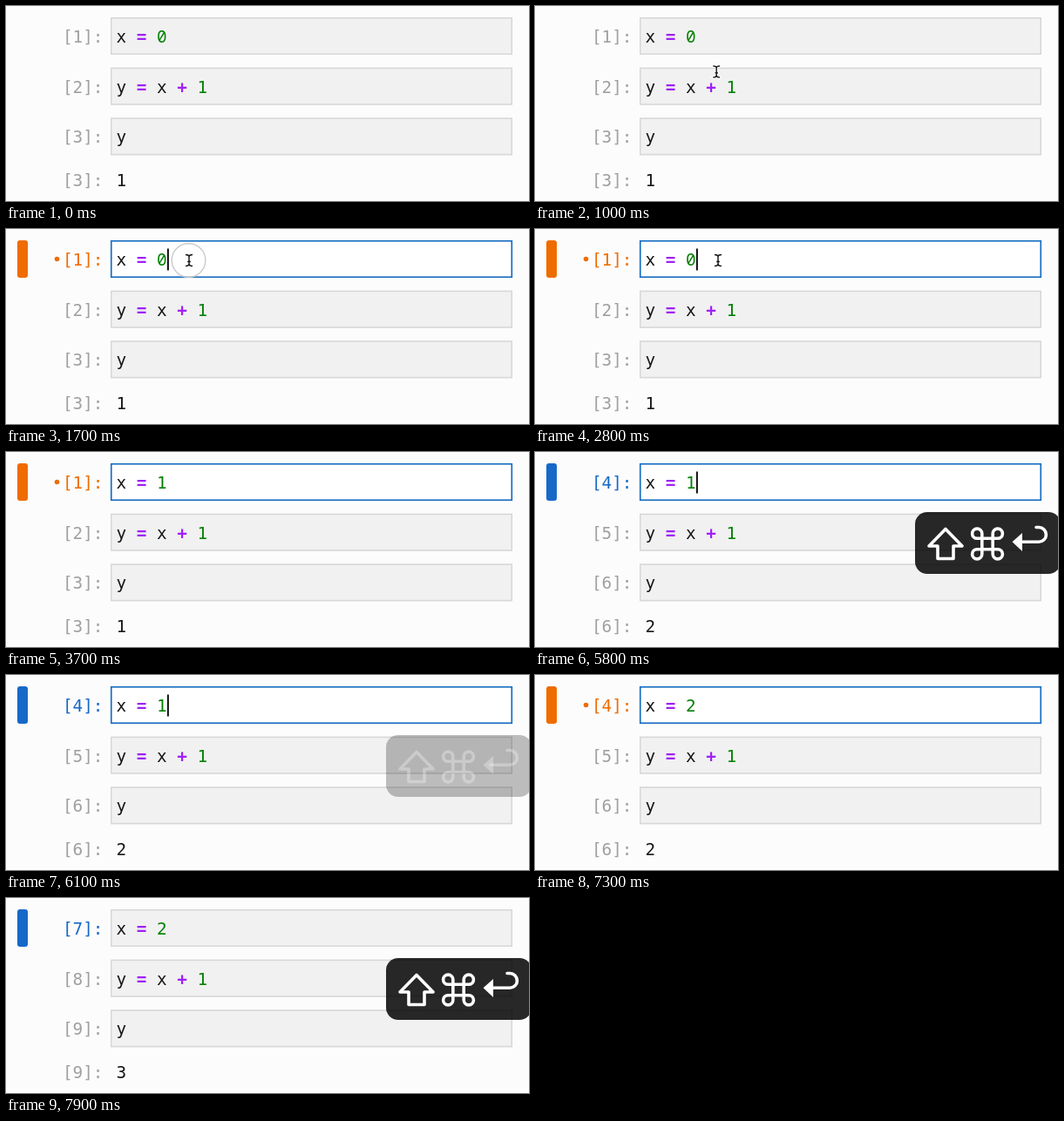
Write an HTML page with a canvas that moves like this. It is 600 px wide and 224 px high and loops after 8 s.

```html
<!DOCTYPE html>
<html lang="en">
<head>
<meta charset="utf-8">
<title>Notebook cells</title>
<style>
  html, body { margin: 0; width: 100%; height: 100%; overflow: hidden; background: #fcfcfc; }
  canvas { display: block; width: 600px; height: 224px; }
</style>
</head>
<body>
<canvas id="stage"></canvas>
<script>
const LOOP = 8000, W = 600, H = 224;
const SIZE = 19.3, ADV = SIZE * 0.602, CODE_X = 126.5, LABEL_X = 65;
const MONO = '"DejaVu Sans Mono", monospace';
const SLASHED = '"Noto Sans Mono", "DejaVu Sans Mono", monospace';
const INK = '#161616', GREEN = '#008000', PURPLE = '#a020f5';
const GREY = '#a0a0a0', BLUE = '#1769c8', ORANGE = '#ef6c00';

const canvas = document.getElementById('stage');
const dpr = window.devicePixelRatio || 1;
canvas.width = W * dpr;
canvas.height = H * dpr;
const ctx = canvas.getContext('2d');

const clamp = v => Math.max(0, Math.min(1, v));
const mix = (a, b, p) => a + (b - a) * p;
const ease = p => p * p * (3 - 2 * p);
const within = (t, a, b) => t >= a && t < b;
const rowY = i => 13 + i * 57.7;

function text(str, x, y, color, weight = 'normal', family = MONO) {
  ctx.font = `${weight} ${SIZE}px ${family}`;
  ctx.fillStyle = color;
  ctx.fillText(str, x, y);
}

function code(tokens, y) {
  tokens.forEach((tok, i) => {
    const x = CODE_X + i * 2 * ADV;
    if (/[=+]/.test(tok)) text(tok, x, y, PURPLE, 'bold');
    else if (/\d/.test(tok)) text(tok, x, y, GREEN, 'normal', tok === '0' ? SLASHED : MONO);
    else text(tok, x, y, INK);
  });
}

function roundRect(x, y, w, h, r) {
  ctx.beginPath();
  ctx.roundRect(x, y, w, h, r);
  ctx.fill();
}

function cell(i, editing) {
  const y = rowY(i);
  ctx.fillStyle = editing ? '#fff' : '#f1f1f1';
  ctx.strokeStyle = editing ? '#1b6fc2' : '#d7d7d7';
  ctx.lineWidth = editing ? 1.7 : 1.5;
  ctx.fillRect(120, y, 461, 43);
  ctx.strokeRect(120.75, y + 0.75, 459.5, 41.5);
}

function stateAt(t) {
  const run = t >= 7800 ? 2 : t >= 4100 ? 1 : 0;
  const deleting = within(t, 3000, 3200) || within(t, 6600, 6700);
  return {
    run,
    value: deleting ? '' : t >= 6700 ? '2' : t >= 3200 ? '1' : '0',
    editing: within(t, 1700, 4100) || within(t, 5800, 7800),
    dirty: within(t, 1700, 4100) || within(t, 6600, 7800),
    selected: t >= 1700,
    caret: within(t, 1700, 2300) || within(t, 2800, 3700) ||
           within(t, 5800, 6400) || within(t, 6600, 7200),
    keys: within(t, 4000, 6200) ? clamp((6200 - t) / 330) : t >= 7700 ? 1 : 0
  };
}

function notebook(s) {
  const accent = s.dirty ? ORANGE : BLUE;
  if (s.selected) {
    ctx.fillStyle = accent;
    roundRect(13, 13, 12, 43, 3);
  }
  const lines = [['x', '=', s.value], ['y', '=', 'x', '+', '1'], ['y']];
  lines.forEach((tokens, i) => {
    const base = rowY(i) + 29;
    cell(i, i === 0 && s.editing);
    text(`[${s.run * 3 + i + 1}]:`, LABEL_X, base, i === 0 && s.selected ? accent : GREY);
    code(tokens, base);
  });
  text(`[${s.run * 3 + 3}]:`, LABEL_X, 207, GREY);
  text(String(s.run + 1), CODE_X, 207, INK);
  if (s.dirty) {
    ctx.fillStyle = ORANGE;
    ctx.beginPath();
    ctx.arc(58.5, 34.5, 2.8, 0, Math.PI * 2);
    ctx.fill();
  }
  if (s.caret) {
    ctx.fillStyle = '#000';
    ctx.fillRect(CODE_X + ADV * (s.value ? 5 : 4) + 0.4, 22.5, 1.8, 25);
  }
}

function outlined(path, x, y) {
  ctx.save();
  ctx.translate(x, y);
  ctx.lineJoin = ctx.lineCap = 'round';
  ctx.strokeStyle = '#fff';
  ctx.lineWidth = 3.6;
  ctx.stroke(path);
  ctx.restore();
}

const ARROW = new Path2D('M0 0V15L3.6 11.8L6 17L8.6 15.9L6.2 10.8H11Z');
const BEAM = new Path2D('M-4 -6.5Q0 -6.5 0 -4Q0 -6.5 4 -6.5M0 -4V4M-4 6.5Q0 6.5 0 4Q0 6.5 4 6.5M-1.8 1.5H1.8');

function pointer(t) {
  if (!within(t, 400, 3000)) return;
  const enter = clamp((t - 400) / 100), rise = ease(clamp((t - 600) / 600));
  const x = mix(mix(216, 203, enter), 210, rise);
  const y = mix(mix(208, 188, enter), 36, rise);
  const overCell = [0, 1, 2].some(i => within(y, rowY(i), rowY(i) + 43));

  const ring = within(t, 1700, 2100) ? clamp((2100 - t) / 300) : 0;
  if (ring) {
    ctx.globalAlpha = ring;
    ctx.beginPath();
    ctx.arc(x - 0.5, y, 19.3, 0, Math.PI * 2);
    ctx.fillStyle = 'rgba(255,255,255,0.35)';
    ctx.fill();
    ctx.strokeStyle = '#cbcbcb';
    ctx.lineWidth = 1.4;
    ctx.stroke();
    ctx.globalAlpha = 1;
  }

  outlined(overCell ? BEAM : ARROW, x, y);
  ctx.save();
  ctx.translate(x, y);
  if (overCell) {
    ctx.strokeStyle = '#111';
    ctx.lineWidth = 1.4;
    ctx.stroke(BEAM);
  } else {
    ctx.fillStyle = '#000';
    ctx.fill(ARROW);
  }
  ctx.restore();
}

const SHIFT = new Path2D('M0 -17L19 2.5H9V17H-9V2.5H-19Z');
const RETURN = new Path2D('M575 86.5H578A8.4 8.4 0 0 1 578 103.3H556');
const HEAD = new Path2D('M547.5 103.3L559 93V114Z');

// Four looped corners joined by a square
function commandPath() {
  const path = new Path2D(), edge = 6.2, mid = 11.8, r = mid - edge;
  for (let i = 0; i < 4; i++) {
    const corner = new Path2D();
    corner.moveTo(edge, -mid);
    corner.lineTo(edge, mid);
    corner.arc(mid, mid, r, Math.PI, -Math.PI / 2, true);
    path.addPath(corner, new DOMMatrix().rotate(i * 90));
  }
  return path;
}
const COMMAND = commandPath();

function keyPanel(alpha) {
  if (!alpha) return;
  ctx.globalAlpha = alpha;
  ctx.fillStyle = 'rgba(0,0,0,0.84)';
  roundRect(436, 69, 167, 71, 14);
  outlined(SHIFT, 471, 105.5);
  outlined(COMMAND, 519, 105.5);
  outlined(RETURN, 0, 0);
  ctx.fillStyle = '#fff';
  ctx.fill(HEAD);
  ctx.globalAlpha = 1;
}

function draw(now) {
  const t = Math.floor((now % LOOP) / 100) * 100;
  const s = stateAt(t);
  ctx.setTransform(dpr, 0, 0, dpr, 0, 0);
  ctx.fillStyle = '#fcfcfc';
  ctx.fillRect(0, 0, W, H);
  notebook(s);
  pointer(t);
  keyPanel(s.keys);
}

let start;
function tick(now) {
  start ??= now;
  draw(Math.max(0, now - start));
  requestAnimationFrame(tick);
}
draw(0);
requestAnimationFrame(tick);
</script>
</body>
</html>
```
